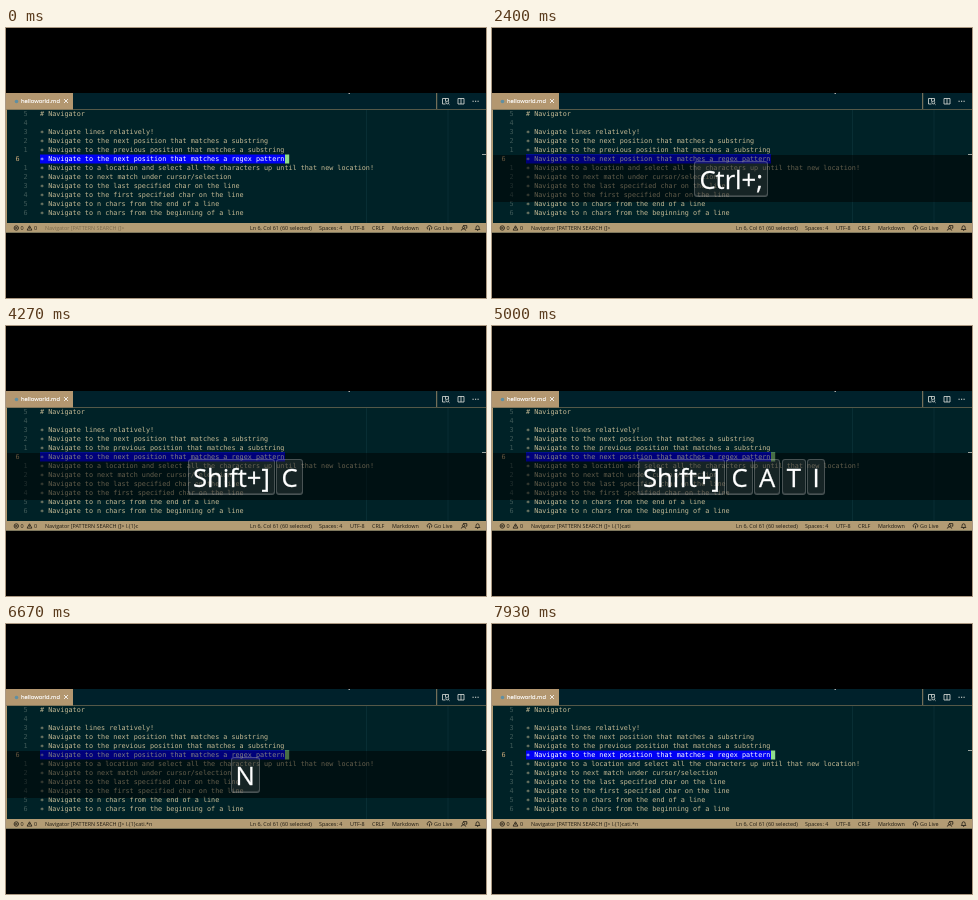
An HTML page for the animation above (8 s loop, 480x270 px).

```html
<!DOCTYPE html>
<html lang="en">
<head>
<meta charset="utf-8">
<title>Editor pattern search</title>
<style>
  html, body { margin: 0; width: 100%; height: 100%; overflow: hidden; background: #000; }
  svg { position: absolute; left: 0; top: 0; }
  text { white-space: pre; }
  .ui { font: 5.4px "Open Sans", sans-serif; fill: #1e1a12; }
  .tab { font-size: 5.8px; fill: #fff; stroke: #fff; stroke-width: .15; }
  .code { font: 6.77px "DejaVu Sans Mono", monospace; fill: #c3b994; }
  .num { fill: #3f5a58; text-anchor: end; }
  .icon { fill: none; stroke-width: .8; }
  #keys {
    position: absolute; left: 1px; top: 127px; width: 479px; height: 47px;
    display: flex; justify-content: center; gap: 1.5px;
    padding: 6px 2.5px 0 0; box-sizing: border-box; background: rgba(0, 0, 0, .5);
  }
  #keys span {
    height: 35.5px; padding: 0 4px; box-sizing: border-box;
    font: 25.6px/36px "Open Sans", sans-serif; color: #fff;
    -webkit-text-stroke: .3px #fff;
    background: rgba(128, 128, 128, .17);
    border: 1px solid rgba(204, 204, 204, .28); border-radius: 3px;
    box-shadow: inset 0 -1px rgba(187, 187, 187, .2);
  }
</style>
</head>
<body>
<svg width="480" height="270" viewBox="0 0 480 270">
  <rect y="65" width="480" height="140" fill="#002227"/>
  <path d="M360.5 82V195M442 82V195" stroke="#0b3238" stroke-width=".8"/>
  <rect y="81" width="1" height="114" fill="#b39c74"/>

  <!-- tab bar -->
  <rect y="65" width="480" height="16.5" fill="#00212b"/>
  <path d="M0 81.5H480" stroke="#a88f68" stroke-width=".5"/>
  <path d="M430.7 65V81" stroke="#b39c74" stroke-width=".8"/>
  <rect y="65" width="67" height="16.5" fill="#b39770"/>
  <circle cx="10.5" cy="73.5" r="1.8" fill="#5f8fa3"/>
  <text class="ui tab" x="15" y="75.3">helloworld.md</text>
  <path class="icon" stroke="#fff" d="M58 71l4 4m0-4l-4 4"/>
  <g class="icon" stroke="#dfe1dc">
    <path d="M442.5 73v-2.500h-6v5.500h3M439.500 70.500v3"/>
    <circle cx="441.300" cy="74.500" r="1.400"/>
    <path d="M442.300 75.500l1.200 1.200M452 70.500h6v5.500h-6zM455 70.500v5.500"/>
  </g>
  <path d="M466.500 73.300h1.200m1.300 0h1.200m1.300 0h1.200" stroke="#e0e2dc" stroke-width="1.100"/>
  <rect x="342.500" y="65" width="1.500" height="1" fill="#aaa"/>

  <!-- editor -->
  <rect x="34" y="126.500" width="245" height="9" fill="#0000f5"/>
  <g id="code" class="code"></g>
  <rect id="cursor" x="279" y="126.500" width="4.200" height="9" fill="#8fdc8c"/>
  <rect x="476" y="126" width="4" height="1" fill="#9aa5a0"/>

  <!-- status bar -->
  <rect y="195" width="480" height="9.700" fill="#b39c74"/>
  <g id="bar" class="ui">
    <text id="prompt" x="39" y="202"></text>
  </g>
  <g class="icon" stroke="#1e1a12">
    <circle cx="10.300" cy="200" r="2.200"/>
    <path d="M9.400 199.100l1.800 1.800m0-1.800l-1.800 1.800M23.500 197.800l2.400 4.300h-4.800zM23.500 199.300v1.400"/>
    <path d="M423.500 199.500v3M421.700 201.400a2.300 2.300 0 1 1 3.600 0"/>
    <circle cx="457.500" cy="199.500" r="1.100"/>
    <path d="M455.300 202.600q0-1.800 2.200-1.800t2.200 1.800M457 197.600h3.800v2.600h-1.200M469.300 201.500h4.600q-.8-.8-.8-2.200a1.500 1.500 0 0 0-3 0q0 1.400-.8 2.200M471 202.300h1.200"/>
  </g>
</svg>
<div id="keys"></div>

<script>
const LOOP = 8000;
const PROMPT = "Navigator [PATTERN SEARCH (]>";
const $ = id => document.getElementById(id);

function addText(parent, x, y, content, cls = "") {
  const node = document.createElementNS("http://www.w3.org/2000/svg", "text");
  node.setAttribute("x", x);
  node.setAttribute("y", y);
  node.setAttribute("class", cls);
  node.textContent = content;
  parent.append(node);
  return node;
}

// the editor font centres its asterisk, hence the operator sign
const lines = [
  "# Navigator",
  "",
  "∗ Navigate lines relatively!",
  "∗ Navigate to the next position that matches a substring",
  "∗ Navigate to the previous position that matches a substring",
  "∗ Navigate to the next position that matches a regex pattern",
  "∗ Navigate to a location and select all the characters up until that new location!",
  "∗ Navigate to next match under cursor/selection",
  "∗ Navigate to the last specified char on the line",
  "∗ Navigate to the first specified char on the line",
  "∗ Navigate to n chars from the end of a line",
  "∗ Navigate to n chars from the beginning of a line"
];
const CURRENT = 5;
lines.forEach((line, i) => {
  const y = 133.2 + (i - CURRENT) * 8.95;
  const here = i === CURRENT;
  const row = addText($("code"), 34, y, line);
  if (here) row.style.fill = "#fff";
  const num = addText($("code"), here ? 13.5 : 21.5, y, here ? 6 : Math.abs(i - CURRENT), "num");
  if (here) num.style.fill = "#c9a878";
});

[[14.5, "0"], [28, "0"], [244, "Ln 6, Col 61 (60 selected)"], [313, "Spaces: 4"],
 [344, "UTF-8"], [366, "CRLF"], [386, "Markdown"], [428, "Go Live"]
].forEach(([x, label]) => addText($("bar"), x, 202, label));

// start time, keys on screen, pattern typed so far (null while inactive)
const steps = [
  [0, "", null],
  [1670, "Ctrl+;", ""],
  [2470, "Ctrl+; L", "l"],
  [2670, "Ctrl+; L .", "l."],
  [3330, "Shift+[", "l.{"],
  [3530, "Shift+[ 1", "l.{1"],
  [4000, "Shift+]", "l.{1}"],
  [4270, "Shift+] C", "l.{1}c"],
  [4400, "Shift+] C A", "l.{1}ca"],
  [4600, "Shift+] C A T", "l.{1}cat"],
  [5000, "Shift+] C A T I", "l.{1}cati"],
  [5330, "Shift+] C A T I .", "l.{1}cati."],
  [5730, "Shift+8", "l.{1}cati.*"],
  [6530, "", "l.{1}cati.*"],
  [6600, "N", "l.{1}cati.*n"],
  [7400, "", "l.{1}cati.*n"]
];

let shown;
function showStep(step) {
  if (step === shown) return;
  shown = step;
  const [, keys, pattern] = step;
  $("keys").style.visibility = keys ? "visible" : "hidden";
  $("keys").replaceChildren(...keys.split(" ").map(key => {
    const cap = document.createElement("span");
    cap.textContent = key;
    return cap;
  }));
  $("prompt").textContent = PROMPT + (pattern ? " " + pattern : "");
  $("prompt").style.fill = pattern === null ? "#7d6c4e" : "#1e1a12";
}

function draw(now) {
  const t = now % LOOP;
  showStep(steps.findLast(([start]) => start <= t));
  const phase = t % 1000;
  $("cursor").style.opacity = phase < 160 || phase >= 660 ? 1 : 0;
  requestAnimationFrame(draw);
}
draw(0);
</script>
</body>
</html>
```
